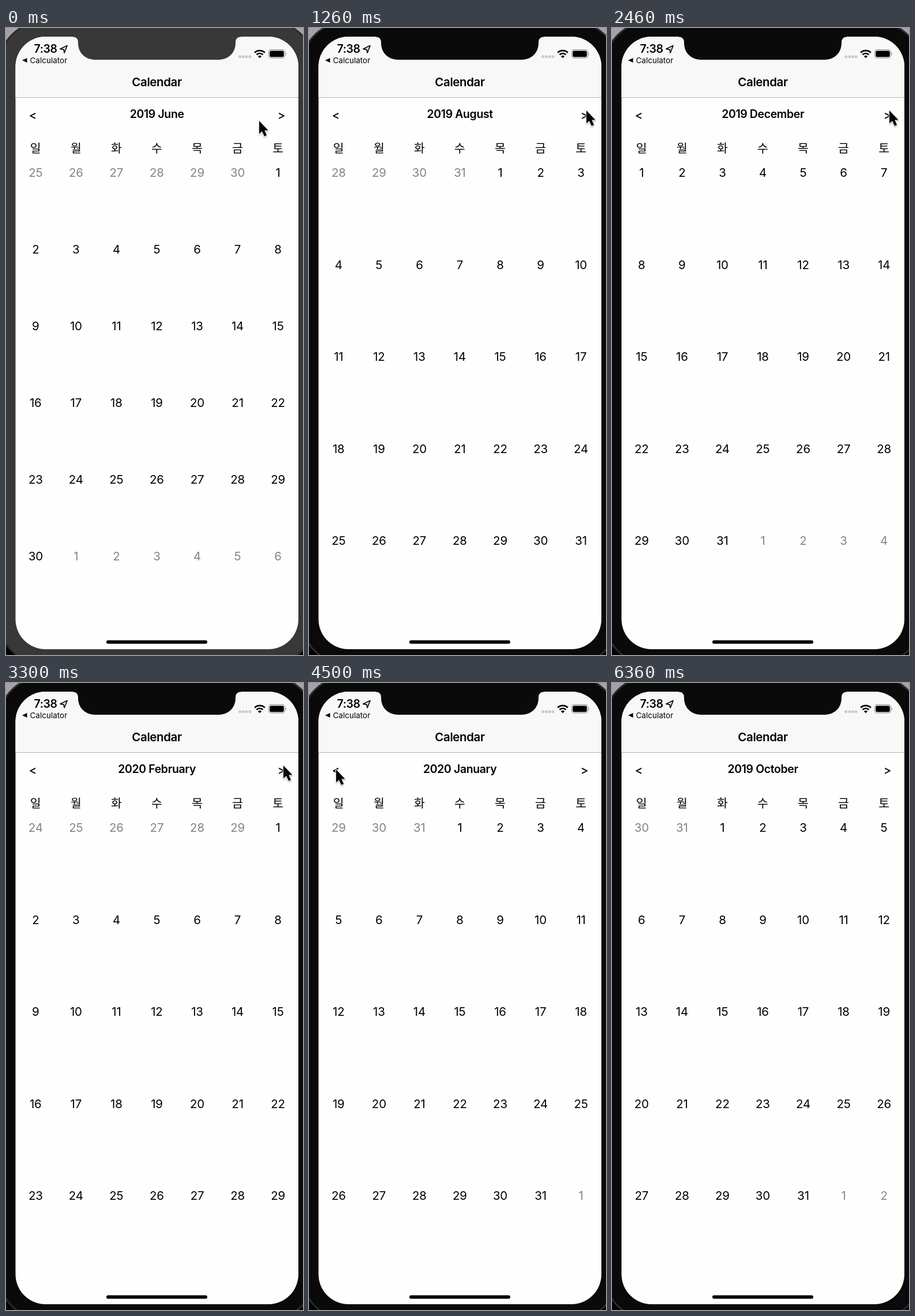
Animation, 515 px wide and 1087 px high, one loop 6.42 s. Source, as an HTML page:

```html
<!DOCTYPE html>
<html lang="ko">
<head>
<meta charset="utf-8">
<title>Calendar</title>
<style>
  html, body { margin: 0; width: 100%; height: 100%; overflow: hidden; background: #000; }
  svg { display: block; width: 100%; height: 100%; }
  text { font-family: Inter, sans-serif; fill: #000; }
  .mid { text-anchor: middle; }
  .bold { font-weight: 600; letter-spacing: -.02em; }
  .day { font-size: 20.5px; letter-spacing: -.01em; }
  .week { font: 20.5px "Noto Sans CJK KR", "Noto Sans CJK", sans-serif; }
  .other { fill: #858585; }
</style>
</head>
<body>
<svg viewBox="0 0 515 1087" preserveAspectRatio="none">
  <defs>
    <clipPath id="screen"><rect x="16.5" y="15" width="490.5" height="1062" rx="52"/></clipPath>
    <filter id="shadow" x="-50%" y="-50%" width="200%" height="200%">
      <feDropShadow dx="0" dy="1.5" stdDeviation="1.3" flood-opacity=".35"/>
    </filter>
  </defs>

  <rect width="515" height="500" fill="#a79fae"/>
  <rect class="bezel" x="-14" y="-12" width="551" height="1116" rx="82" stroke="#2b2b2b" stroke-width="3"/>
  <g clip-path="url(#screen)">
    <rect width="515" height="1087" fill="#fefefe"/>
    <rect width="515" height="120" fill="#f8f8f8"/>
    <rect y="120" width="515" height="1" fill="#b4b4b4"/>
  </g>
  <path class="bezel" d="M116 14V15.500Q125 15.500 125 25V27A28 28 0 0 0 153 55H370A28 28 0 0 0 398 27V25Q398 15.500 407 15.500V14Z"/>

  <!-- status bar -->
  <text class="bold" x="48.500" y="43.300" font-size="19.500">7:38</text>
  <path d="M106 30.500L94 36.300L100 37.300L101.200 43Z" fill="none" stroke="#000" stroke-width="1.700" stroke-linejoin="round"/>
  <path d="M28 56L36.500 52V60Z"/>
  <text x="41.500" y="61" font-size="13.500">Calculator</text>
  <g fill="#c9c9c9">
    <circle cx="405.700" cy="49.700" r="2.500"/><circle cx="411.500" cy="49.700" r="2.500"/>
    <circle cx="417.300" cy="49.700" r="2.500"/><circle cx="423" cy="49.700" r="2.500"/>
  </g>
  <g fill="none" stroke="#000" stroke-width="2.700">
    <path d="M431.200 42.800A12.500 12.500 0 0 1 448.800 42.800"/>
    <path d="M434.500 46.200A8 8 0 0 1 445.500 46.200"/>
  </g>
  <path d="M440 52.200L436.800 49A4.500 4.500 0 0 1 443.200 49Z"/>
  <rect x="455.500" y="37.700" width="28" height="14.200" rx="4" fill="none" stroke="#999" stroke-width="1.200"/>
  <rect x="457.200" y="39.400" width="24.600" height="10.800" rx="2.500"/>
  <path d="M485 42.200Q487.300 44.800 485 47.400Z" fill="#999"/>

  <text class="mid bold" x="261.500" y="101" font-size="20.500">Calendar</text>
  <text class="mid bold" id="title" x="261.700" y="156" font-size="19.500"></text>
  <g class="mid" font-size="20" stroke="#000" stroke-width=".3">
    <text x="46.500" y="158">&lt;</text>
    <text x="477.500" y="158">&gt;</text>
  </g>
  <g id="week"></g>
  <g id="days"></g>
  <rect x="174" y="1061.500" width="175" height="6" rx="3"/>

  <path id="cursor" d="M0 0V22.500L5 18L9 26.800L13.200 25L9.300 16.600L15.500 16.200Z"
        stroke="#fff" stroke-width="1.500" paint-order="stroke" filter="url(#shadow)"/>
</svg>
<script>
const LOOP = 6420, STEP = 60, ACTIVATE = 720;
const FORWARD = [900, 1140, 1440, 1680, 1980, 2280, 2580, 2880];
const BACK = [4320, 4560, 4800, 5220];
// time, x, y of the pointer tip
const PATH = [
  [0, 439, 161], [60, 439, 161], [660, 481, 143], [3360, 481, 143], [3600, 330, 196],
  [3900, 108, 157], [4140, 47, 150], [5640, 47, 150], [6300, 24, 1095], [LOOP, 24, 1095]
];
const MONTHS = ["January", "February", "March", "April", "May", "June", "July",
  "August", "September", "October", "November", "December"];

const get = id => document.getElementById(id);
const columnX = c => 51.3 + 70.05 * c;

function addText(parent, cls, x, y, content) {
  const el = document.createElementNS("http://www.w3.org/2000/svg", "text");
  el.setAttribute("class", "mid " + cls);
  el.setAttribute("x", x);
  el.setAttribute("y", y);
  el.textContent = content;
  parent.append(el);
}

function showMonth(index) {
  const year = 2019 + Math.floor(index / 12), month = index % 12;
  const offset = new Date(year, month, 1).getDay();
  const length = new Date(year, month + 1, 0).getDate();
  const rows = Math.ceil((offset + length) / 7);
  get("title").textContent = year + " " + MONTHS[month];
  get("days").replaceChildren();
  for (let i = 0; i < rows * 7; i++) {
    const day = i - offset + 1;
    const inside = day > 0 && day <= length;
    // Leading days count back from this month's own length.
    const label = day < 1 ? length + day : inside ? day : day - length;
    const y = 258 + Math.floor(i / 7) * 798 / rows;
    addText(get("days"), inside ? "day" : "day other", columnX(i % 7), y, label);
  }
}

function pointerAt(t) {
  const next = PATH.findIndex(p => p[0] > t);
  const [t0, x0, y0] = PATH[next - 1], [t1, x1, y1] = PATH[next];
  const k = (t - t0) / (t1 - t0);
  return [x0 + (x1 - x0) * k, y0 + (y1 - y0) * k];
}

let shown = -1;
function draw(now) {
  const t = Math.floor(now % LOOP / STEP) * STEP;
  const clicks = list => list.filter(at => at <= t).length;
  const index = 5 + clicks(FORWARD) - clicks(BACK);
  if (index !== shown) showMonth(shown = index);
  const shade = t < ACTIVATE ? "#383838" : "#0a0a0a";
  document.querySelectorAll(".bezel").forEach(el => el.setAttribute("fill", shade));
  get("cursor").setAttribute("transform", `translate(${pointerAt(t)})`);
}

[..."일월화수목금토"].forEach((name, c) => addText(get("week"), "week", columnX(c), 216, name));

let start;
function tick(now) {
  start ??= now;
  draw(Math.max(0, now - start));
  requestAnimationFrame(tick);
}
draw(0);
requestAnimationFrame(tick);
</script>
</body>
</html>
```
